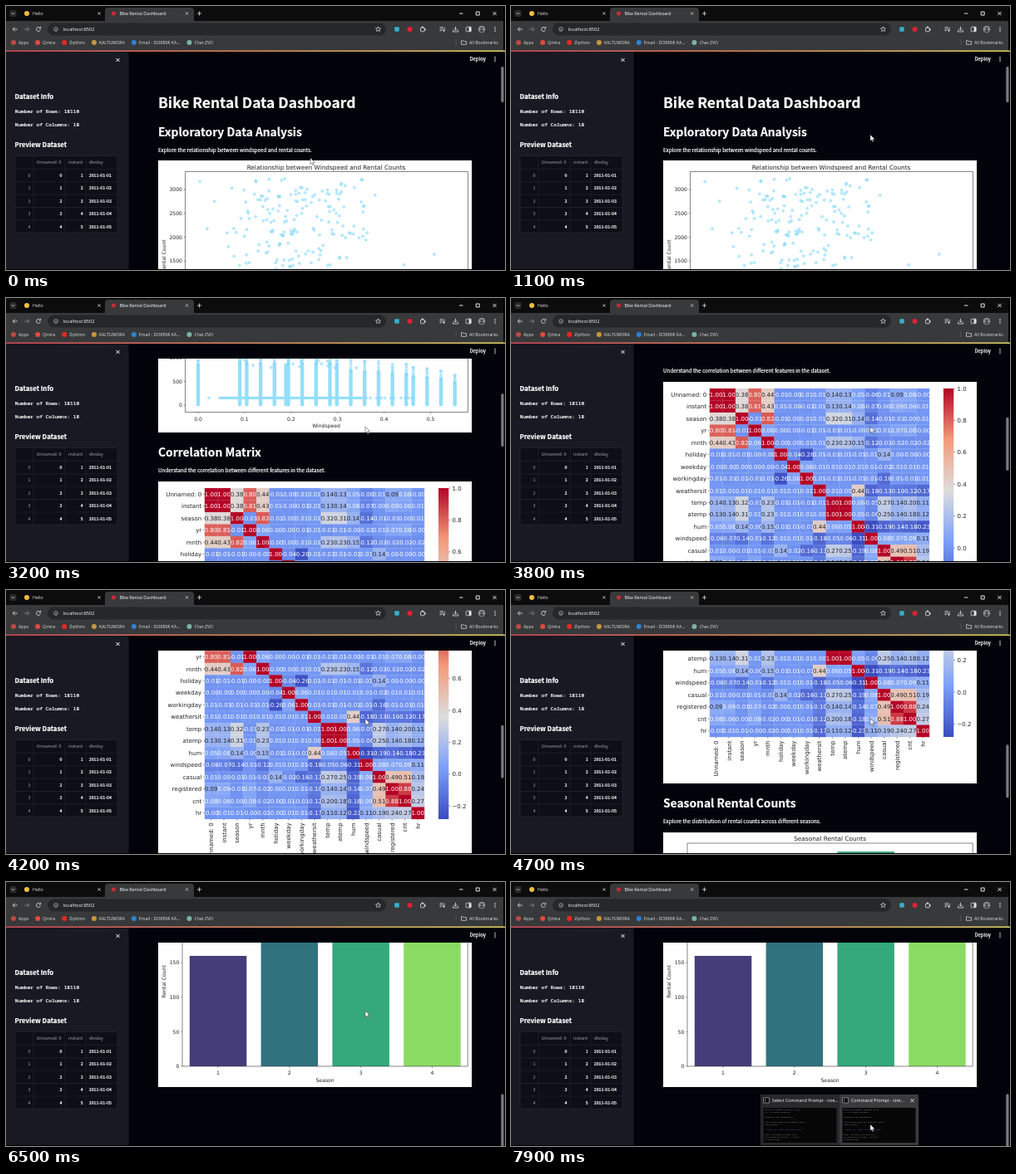
An HTML page with a canvas for the animation above (8000 ms loop, 600 by 318 pixels).

```html
<!DOCTYPE html>
<html lang="en">
<head>
<meta charset="utf-8">
<title>Bike Rental Dashboard</title>
<style>
html, body { margin: 0; width: 100%; height: 100%; overflow: hidden; background: #000; }
canvas { display: block; width: 600px; height: 318px; }
</style>
</head>
<body>
<canvas id="stage"></canvas>
<script>
const W = 600, H = 318, LOOP = 8000;
const canvas = document.getElementById('stage');
const dpr = window.devicePixelRatio || 1;
canvas.width = W * dpr;
canvas.height = H * dpr;
const c = canvas.getContext('2d');
c.lineJoin = 'round';

const UI = '"Open Sans", "Noto Sans", sans-serif';
const PAGE = '"Noto Sans CJK JP", "Noto Sans CJK SC", "Open Sans", sans-serif';
const PLOT = '"DejaVu Sans", sans-serif';
const MONO = '"Noto Sans Mono", "DejaVu Sans Mono", monospace';

// [time, scroll offset]
const SCROLL = [[1100, 0], [2200, 138], [3200, 264], [3800, 384], [4700, 562], [5500, 729], [6200, 850]];
// [time, x, y]
const MOUSE = [[100, 366, 183], [900, 432, 155], [6500, 432, 155], [7200, 432, 292]];
const PREVIEW_AT = 7300;

function track(keys, t, col = 1) {
  let i = 1;
  while (i < keys.length - 1 && t > keys[i][0]) i++;
  const a = keys[i - 1], b = keys[i];
  const p = Math.min(1, Math.max(0, (t - a[0]) / (b[0] - a[0])));
  return a[col] + (b[col] - a[col]) * p;
}

function random(seed) {
  return () => (seed = (seed * 16807) % 2147483647) / 2147483647;
}

const times = (n, fn) => Array.from({ length: n }, (_, i) => fn(i));

function box(x, y, w, h, fill, r = 0) {
  c.fillStyle = fill;
  c.beginPath();
  c.roundRect(x, y, w, h, r);
  c.fill();
}

function frame(x, y, w, h, color, lw = 0.5, r = 0) {
  c.strokeStyle = color;
  c.lineWidth = lw;
  c.beginPath();
  c.roundRect(x, y, w, h, r);
  c.stroke();
}

function dot(x, y, r, fill) {
  c.fillStyle = fill;
  c.beginPath();
  c.arc(x, y, r, 0, 7);
  c.fill();
}

function path(pts, color, lw = 0.8) {
  c.strokeStyle = color;
  c.lineWidth = lw;
  c.beginPath();
  pts.forEach(([x, y]) => c.lineTo(x, y));
  c.stroke();
}

const across = (x1, x2, y, color, lw) => path([[x1, y], [x2, y]], color, lw);
const down = (x, y1, y2, color, lw) => path([[x, y1], [x, y2]], color, lw);

function cross(x, y, r, color, lw = 0.8) {
  path([[x - r, y - r], [x + r, y + r]], color, lw);
  path([[x - r, y + r], [x + r, y - r]], color, lw);
}

function dots(x, y, color) {
  for (const d of [-2.3, 0, 2.3]) dot(x, y + d, 0.75, color);
}

// y is the middle of the capitals
function text(s, x, y, size, family, color = '#fff', align = 'left', weight = 400) {
  c.font = `${weight} ${size}px ${family}`;
  c.textAlign = align;
  c.fillStyle = color;
  c.fillText(s, x, y + size * 0.36);
}

// page text with slightly thickened strokes
function strong(s, x, y, size, family = PAGE, align = 'left', weight = 500) {
  text(s, x, y, size, family, '#fff', align, weight);
  c.strokeStyle = '#fff';
  c.lineWidth = 0.22;
  c.strokeText(s, x, y + size * 0.36);
}

function turned(s, x, y, size, align = 'center') {
  c.save();
  c.translate(x, y);
  c.rotate(-Math.PI / 2);
  text(s, 0, 0, size, PLOT, '#222', align);
  c.restore();
}

function section(title, note, y) {
  strong(title, 183, y, 13.8, PAGE, 'left', 700);
  strong(note, 183, y + 22, 6.3);
}

function tick(s, x, y, size, side) {
  if (side === 'x') {
    down(x, y, y + 1.6, '#222', 0.5);
    text(s, x, y + 8, size, PLOT, '#222', 'center');
  } else {
    across(x - 1.6, x, y, '#222', 0.5);
    text(s, x - 3.6, y, size, PLOT, '#222', 'right');
  }
}

// ---- scatter plot ----
const windX = v => 231 + v * 559;
const countY = v => 393 - v * 0.0573;

function marker(x, y) {
  dot(x, y, 1.5, 'rgba(135,215,250,.5)');
  c.strokeStyle = 'rgba(125,215,248,.7)';
  c.lineWidth = 0.7;
  c.stroke();
}

function column(x, top) {
  down(x, countY(12), countY(top), '#93dffa', 4.4);
}

function scatter() {
  box(183, 186, 377, 240, '#fff');
  const rnd = random(4271);
  c.lineCap = 'round';
  // wind is logged in whole knots, stored as rounded km/h over 67
  for (let knots = 0; knots <= 20; knots++) {
    if (knots === 1 || knots === 2) continue;
    const x = windX(Math.round(knots * 1.852) / 67);
    const top = 940 - 2.8 * Math.max(0, knots - 9) ** 2 + rnd() * 60;
    const solid = top * (knots > 11 ? 0.75 : 0.9);
    column(x, solid);
    for (let n = solid; n < top; n += 25 + rnd() * 45) marker(x, countY(n));
    marker(x, countY(top));
  }
  column(windX(0.189), 840);
  across(257, 426, countY(150), '#93dffa', 3.2);
  c.lineCap = 'butt';
  marker(244, countY(150));
  for (let x = 428; x < 492; x += 3 + rnd() * 6) marker(x, countY(150));
  for (let i = 0; i < 225; i++) {
    const spread = (rnd() + rnd() + rnd() - 1.5) * 95;
    marker(354 + spread, countY(780 + rnd() * 2450));
  }
  marker(515, countY(1640));

  frame(215.5, 199.5, 340, 202, '#333', 0.6);
  for (let i = 0; i < 6; i++) tick((i / 10).toFixed(1), windX(i / 10), 401.5, 6.1, 'x');
  for (let n = 0; n <= 3000; n += 500) tick(n, 215.5, countY(n), 6.1, 'y');
  text('Relationship between Windspeed and Rental Counts', 385, 194, 7.3, PLOT, '#222', 'center');
  text('Windspeed', 385, 418, 6.1, PLOT, '#222', 'center');
  turned('Rental Count', 190, 301, 6.1);
}

// ---- correlation matrix ----
// each field leans on a few shared factors; correlation is the dot product
const FIELDS = {
  'Unnamed: 0': { trend: .91, year: .41 },
  instant: { trend: .91, year: .41 },
  season: { year: .91 },
  yr: { trend: .88 },
  mnth: { year: .91, trend: .08, heat: -.1 },
  holiday: { work: -.5 },
  weekday: { work: .1 },
  workingday: { work: .5 },
  weathersit: { wet: .54 },
  temp: { heat: .94, year: .34 },
  atemp: { heat: .94, year: .34 },
  hum: { wet: .8, year: .16 },
  windspeed: { wet: -.34, year: -.14 },
  casual: { demand: .44, heat: .28, wet: -.24, work: -.3 },
  registered: { demand: .88, heat: .16, wet: -.18, trend: .09 },
  cnt: { demand: .92, heat: .2, wet: -.22, trend: .08 },
  hr: { demand: .2, heat: .13, wet: -.3 }
};
const NAMES = Object.keys(FIELDS);

function corr(i, j) {
  if (i === j) return 1;
  const a = FIELDS[NAMES[i]], b = FIELDS[NAMES[j]];
  let sum = 0.012 * Math.sin(3 * i * j + i + j);
  for (const k in a) sum += a[k] * (b[k] || 0);
  return Math.min(1, sum);
}

// cool to warm, five even stops
const WARM = ['#3b4cc0', '#7b9ff9', '#dddddd', '#f49a7b', '#b40426'];
const rgb = hex => [1, 3, 5].map(k => parseInt(hex.slice(k, k + 2), 16));

function warm(v) {
  const p = Math.min(1, Math.max(0, (v + 0.28) / 1.28)) * 4;
  const i = Math.min(3, Math.floor(p));
  const a = rgb(WARM[i]), b = rgb(WARM[i + 1]);
  return a.map((n, k) => Math.round(n + (b[k] - n) * (p - i)));
}

function luminance(color) {
  const [r, g, b] = color.map(n => (n / 255) ** 2.2);
  return 0.2126 * r + 0.7152 * g + 0.0722 * b;
}

function heatmap() {
  const x0 = 238.8, y0 = 493, cw = 15.54, ch = 14.47, bottom = y0 + ch * 17;
  box(183, 485, 377, 310, '#fff');
  const each = fn => NAMES.forEach((_, i) => NAMES.forEach((_, j) => fn(i, j, corr(i, j))));
  each((i, j, v) => box(x0 + j * cw, y0 + i * ch, cw + 0.2, ch + 0.2, `rgb(${warm(v)})`));
  each((i, j, v) => {
    const ink = luminance(warm(v)) > 0.408 ? '#262626' : '#fff';
    text(v.toFixed(2), x0 + (j + 0.5) * cw, y0 + (i + 0.5) * ch, 7, PLOT, ink, 'center');
  });
  NAMES.forEach((name, i) => {
    tick(name, x0, y0 + (i + 0.5) * ch, 7, 'y');
    const x = x0 + (i + 0.5) * cw;
    down(x, bottom, bottom + 1.6, '#222', 0.5);
    turned(name, x, bottom + 4.5, 7, 'right');
  });
  const shade = c.createLinearGradient(0, bottom, 0, y0);
  WARM.forEach((color, i) => shade.addColorStop(i / 4, color));
  box(520, y0, 12.3, bottom - y0, shade);
  for (let n = -1; n <= 5; n++) {
    const y = y0 + (5 - n) * 38.4;
    across(532.3, 534, y, '#222', 0.5);
    text((n / 5).toFixed(1).replace('-', '\u2212'), 536.5, y, 7, PLOT, '#222');
  }
}

// ---- seasonal bars ----
const BARS = [[160, '#433e7a'], [220, '#31727f'], [234.5, '#35a87c'], [212, '#8adb64']];

function bars() {
  const base = 1072, k = 0.832;
  box(183, 854, 377, 243, '#fff');
  BARS.forEach(([v, color], i) => {
    const x = 220.8 + i * 85.8;
    box(x, base - v * k, 68.5, v * k, color);
    tick(i + 1, x + 34.2, base, 6.15, 'x');
  });
  for (let v = 0; v <= 200; v += 50) tick(v, 212, base - v * k, 6.15, 'y');
  frame(212, 867, 343.2, 205, '#333', 0.6);
  text('Seasonal Rental Counts', 383.6, 861, 7.35, PLOT, '#222', 'center');
  text('Season', 383.6, 1089, 6.15, PLOT, '#222', 'center');
  turned('Rental Count', 190, 970, 6.15);
}

// ---- page ----
function content(scroll) {
  box(0, 55, W, 262, '#02030a');
  c.save();
  c.beginPath();
  c.rect(148, 73, 446, 244);
  c.clip();
  c.translate(0, -scroll);
  strong('Bike Rental Data Dashboard', 183, 116.5, 17.4, PAGE, 'left', 700);
  section('Exploratory Data Analysis', 'Explore the relationship between windspeed and rental counts.', 151.7);
  if (scroll < 360) scatter();
  section('Correlation Matrix', 'Understand the correlation between different features in the dataset.', 450);
  if (scroll > 160 && scroll < 730) heatmap();
  section('Seasonal Rental Counts', 'Explore the distribution of rental counts across different seasons.', 819);
  if (scroll > 530) bars();
  c.restore();

  strong('Deploy', 557.5, 64, 5.9);
  dots(588, 64, '#fff');
  const top = 52 + scroll * 0.239, y = Math.max(73, top);
  box(595.3, y, 3.2, top + 64 - y, '#7a7a80', 1.6);
}

function sidebar() {
  box(0, 55, 147.5, 262, '#181922');
  cross(134.5, 65, 2, '#fff', 1);
  strong('Dataset Info', 10.5, 109, 7.85, PAGE, 'left', 700);
  strong('Number of Rows: 18110', 10.7, 126.5, 6.15, MONO);
  strong('Number of Columns: 18', 10.7, 143, 6.15, MONO);
  strong('Preview Dataset', 10.5, 167.5, 7.85, PAGE, 'left', 700);

  const line = '#2b2c36', grey = '#a3a4ab';
  box(11, 180.5, 123, 92.5, '#0d0e16', 2);
  frame(11, 180.5, 123, 92.5, line, 0.6, 2);
  for (const x of [33, 71, 96]) down(x, 180.5, 273, line, 0.5);
  text('Unnamed: 0', 36.5, 188.3, 5.3, PAGE, grey);
  text('instant', 75, 188.3, 5.3, PAGE, grey);
  text('dteday', 99.7, 188.3, 5.3, PAGE, grey);
  for (let i = 0; i < 5; i++) {
    const y = 204 + i * 15.4;
    across(11, 134, y - 7.7, line, 0.5);
    text(i, 29.5, y, 5.3, PAGE, grey, 'right');
    strong(i, 67.5, y, 5.3, PAGE, 'right');
    strong(i + 1, 92.7, y, 5.3, PAGE, 'right');
    strong('2011-01-0' + (i + 1), 99.7, y, 5.3);
  }
}

// ---- browser window ----
const INK = '#e2e3e4';
const BOOKMARKS = { Apps: '#bd4a44', Qmira: '#e04a3f', ZipVoro: '#f02525', KALTUMORA: '#c9963e', 'Email - DOREMI KA...': '#2b83d8', 'Chat ZVO': '#76b5a5' };

function tabs() {
  box(0, 0, W, 19, '#0c0c0d');
  box(119, 2, 107, 20, '#38393a', 4);
  box(4.5, 5, 8, 8, '#2a2b2c', 2);
  path([[6.7, 8.2], [8.5, 10], [10.3, 8.2]], INK);
  dot(25, 9, 3, '#f0bf3c');
  text('Hello', 32, 9, 5.3, UI, INK);
  cross(112, 9, 1.6, INK, 0.7);
  dot(129.5, 9, 2.5, '#c8283a');
  text('Bike Rental Dashboard', 136.5, 9, 5.3, UI, '#fff');
  cross(217.5, 9, 1.6, INK, 0.7);
  across(230, 235, 9, INK);
  down(232.5, 6.5, 11.5, INK);
  across(545, 549.5, 9, INK, 1);
  frame(565.2, 7, 4, 4, INK, 1);
  cross(587.5, 9, 2.1, INK, 1);
}

function arrow(x, dir, color) {
  across(x - 2.8, x + 2.8, 28, color);
  path([[x + dir * 0.3, 25.5], [x + dir * 2.8, 28], [x + dir * 0.3, 30.5]], color);
}

function toolbar() {
  box(0, 18, W, 36, '#38393a');
  arrow(11, -1, INK);
  arrow(25, 1, '#8a8b8d');
  c.strokeStyle = INK;
  c.lineWidth = 0.8;
  c.beginPath();
  c.arc(39, 28, 2.5, 0.3, 5.5);
  c.stroke();
  path([[41.6, 24.8], [41.6, 27], [39.6, 27]], INK);

  box(50, 20.5, 407, 15, '#262728', 7.5);
  frame(57.7, 25.7, 4.6, 4.6, INK, 0.6, 2.3);
  down(60, 27.6, 29.4, INK, 0.6);
  text('localhost:8502', 68.7, 28, 5.6, UI, '#fff');
  path(times(11, i => {
    const r = i % 2 ? 1.4 : 3.2, a = i * Math.PI / 5 - Math.PI / 2;
    return [447.5 + r * Math.cos(a), 28 + r * Math.sin(a)];
  }), INK, 0.7);

  box(467.2, 25.2, 5.6, 5.6, '#2fb0cc', 1);
  dot(485.5, 28, 3, '#df2038');
  frame(498.6, 26, 4.6, 4.8, INK, 0.8, 0.6);
  dot(500.8, 25.6, 1, INK);
  dot(503.8, 28.3, 1, INK);
  for (let i = 0; i < 3; i++) across(521.5, i > 1 ? 524 : 526, 25.7 + i * 2, INK);
  dot(526.5, 29.7, 1.1, INK);
  down(527.4, 25.6, 29.7, INK, 0.6);
  down(540.5, 24.8, 29, INK);
  path([[538.5, 27.2], [540.5, 29.2], [542.5, 27.2]], INK);
  path([[537.5, 29], [537.5, 31], [543.5, 31], [543.5, 29]], INK);
  frame(553.2, 25.2, 6, 5.6, INK, 0.7, 0.8);
  box(556.6, 25.2, 2.6, 5.6, INK);
  dot(572, 28, 4.3, '#8b8d90');
  dot(572, 27, 1.5, '#404144');
  box(569.7, 28.7, 4.6, 2.6, '#404144', 1.3);
  dots(588, 28, INK);
}

function bookmarks() {
  let x = 9;
  for (const name in BOOKMARKS) {
    dot(x, 44, 3, BOOKMARKS[name]);
    text(name, x + 6, 44, 5.2, UI, INK);
    x += c.measureText(name).width + 17;
  }
  down(541, 40.5, 47.5, '#67686b', 0.6);
  path([[547.5, 46.3], [547.5, 41.8], [549.8, 41.8], [550.6, 42.7], [553.6, 42.7], [553.6, 46.3], [547.5, 46.3]], INK, 0.7);
  text('All Bookmarks', 557, 44, 5.2, UI, INK);

  box(598, 0, 2, 54, '#000');
  const glow = c.createLinearGradient(0, 0, W, 0);
  glow.addColorStop(0, '#d8465a');
  glow.addColorStop(1, '#e2d766');
  box(0, 53.6, W, 1.4, glow);
}

// ---- taskbar previews ----
const LOG = `Microsoft Windows [Version 10.0]
(c) All rights reserved.

streamlit run dashboard.py

You can now view your Streamlit app in
your browser.

  Local URL: http://localhost:8502

data = pd.read_csv("hour.csv")
sns.barplot(x="season", y="cnt")
st.pyplot(fig)`.split('\n');

function preview(x, title, active) {
  box(x, 256, 95, 61, active ? '#3b3b3d' : '#29292b');
  box(x + 3.5, 260, 7, 6, '#0b0b0b');
  frame(x + 3.5, 260, 7, 6, '#b8b8b8', 0.6);
  path([[x + 5, 262], [x + 6.3, 263], [x + 5, 264]], '#eee', 0.5);
  text(title, x + 14, 263.3, 5.3, UI, '#fff');
  if (active) cross(x + 87.5, 263.3, 2.1, '#fff');
  box(x + 3.5, 272, 88, 42, '#060607');
  LOG.forEach((s, i) => text(s, x + 5, 274.5 + i * 3, 2.2, MONO, s.includes('URL') ? '#4d6fd0' : '#929296'));
}

function pointer(x, y) {
  const pts = [[0, 0], [0, 7.6], [1.8, 6], [3, 8.8], [4.2, 8.3], [3, 5.6], [5.4, 5.4]];
  c.beginPath();
  pts.forEach(([a, b]) => c.lineTo(x + a, y + b));
  c.closePath();
  c.fillStyle = '#fff';
  c.fill();
  c.strokeStyle = '#333';
  c.lineWidth = 0.5;
  c.stroke();
}

function draw(t) {
  c.setTransform(dpr, 0, 0, dpr, 0, 0);
  box(0, 0, W, H, '#000');
  content(track(SCROLL, t));
  sidebar();
  tabs();
  toolbar();
  bookmarks();
  if (t >= PREVIEW_AT) {
    preview(300, 'Select Command Prompt - stre...', false);
    preview(395, 'Command Prompt - stre...', true);
  }
  pointer(track(MOUSE, t), track(MOUSE, t, 2));
}

const start = performance.now();
function loop() {
  const t = (performance.now() - start) % LOOP;
  draw(Math.floor(t / 100) * 100);
  requestAnimationFrame(loop);
}
loop();
</script>
</body>
</html>
```
